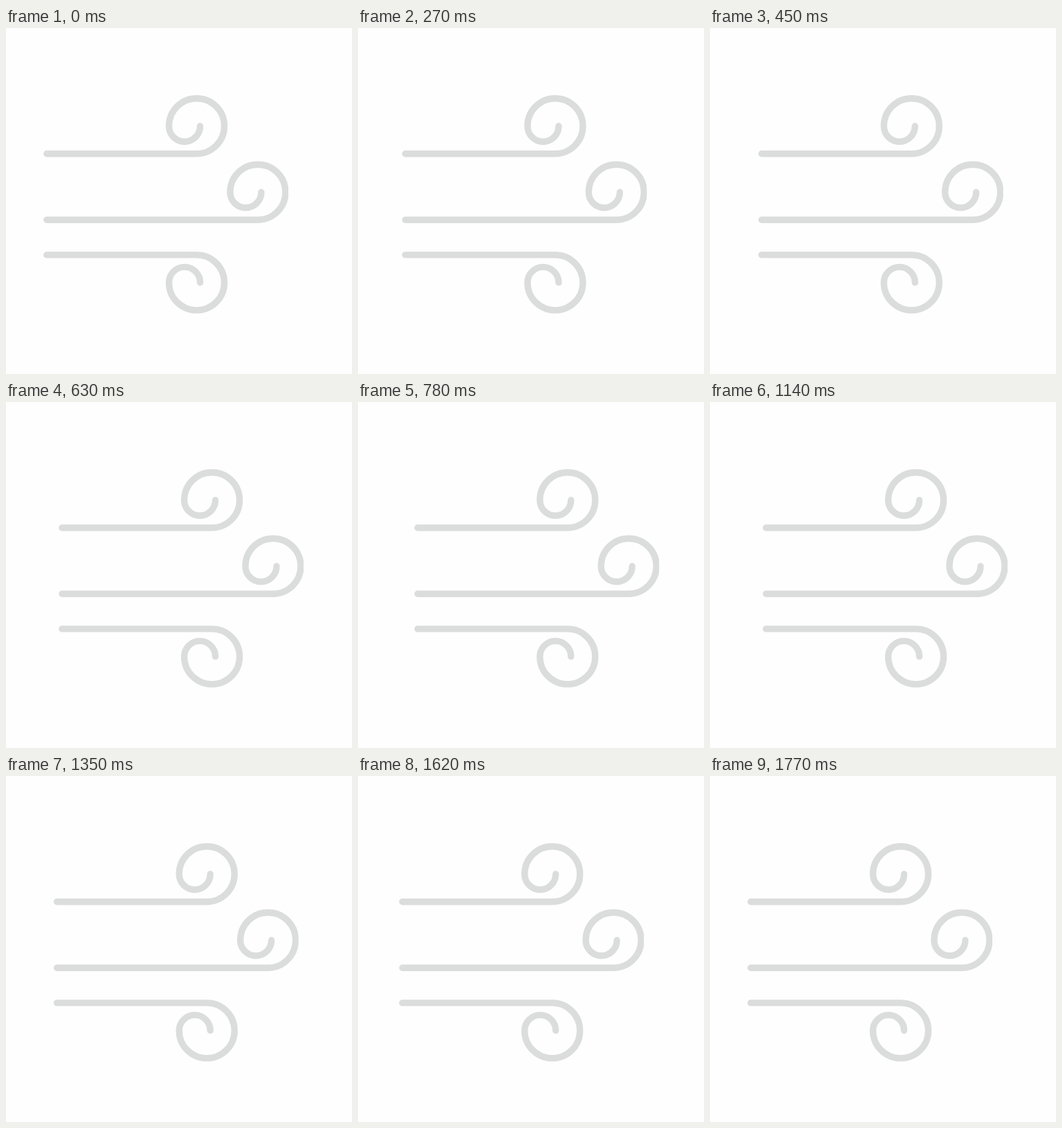
Write an HTML page that moves like this. It is 500x500 px and loops after 1800 ms.

```html
<!DOCTYPE html>
<html lang="en">
<head>
<meta charset="utf-8">
<title>Wind</title>
<style>
  html, body { margin: 0; width: 100%; height: 100%; overflow: hidden; background: #fefefe; }
  svg { display: block; width: 100%; height: 100%; }
</style>
</head>
<body>
<svg viewBox="0 0 500 500">
  <clipPath id="edge"><rect width="408" height="500"/></clipPath>
  <g id="wind" clip-path="url(#edge)" fill="none" stroke="#dbdddc" stroke-width="9.4" stroke-linecap="round" stroke-linejoin="round"></g>
</svg>
<script>
const LOOP = 1800, STEP = 30, SHIFT = 31;
const START_X = 58.8, OUTER = 40, INNER = 22.5;
const wind = document.getElementById('wind');

// A straight line that rolls into a large three-quarter arc and a small half arc.
function addGust(y, cx, up) {
  const dir = up ? -1 : 1;
  const sweep = up ? 0 : 1;
  const cy = y + dir * OUTER;
  const left = cx - OUTER;
  const path = document.createElementNS('http://www.w3.org/2000/svg', 'path');
  path.setAttribute('d',
    `M${START_X} ${y}H${cx}` +
    `A${OUTER} ${OUTER} 0 1 ${sweep} ${left} ${cy}` +
    `A${INNER} ${INNER} 0 0 ${sweep} ${left + 2 * INNER} ${cy}`);
  wind.append(path);
}

addGust(181.7, 275.5, true);
addGust(277.2, 363.9, true);
addGust(327.9, 275.5, false);

function render(time) {
  const t = Math.floor((time % LOOP) / STEP) * STEP;
  const phase = t / (LOOP - STEP);
  const x = SHIFT * (1 - Math.abs(2 * phase - 1));
  wind.setAttribute('transform', `translate(${x.toFixed(3)} 0)`);
}

const begin = performance.now();
function tick() {
  render(performance.now() - begin);
  requestAnimationFrame(tick);
}
tick();
</script>
</body>
</html>
```
